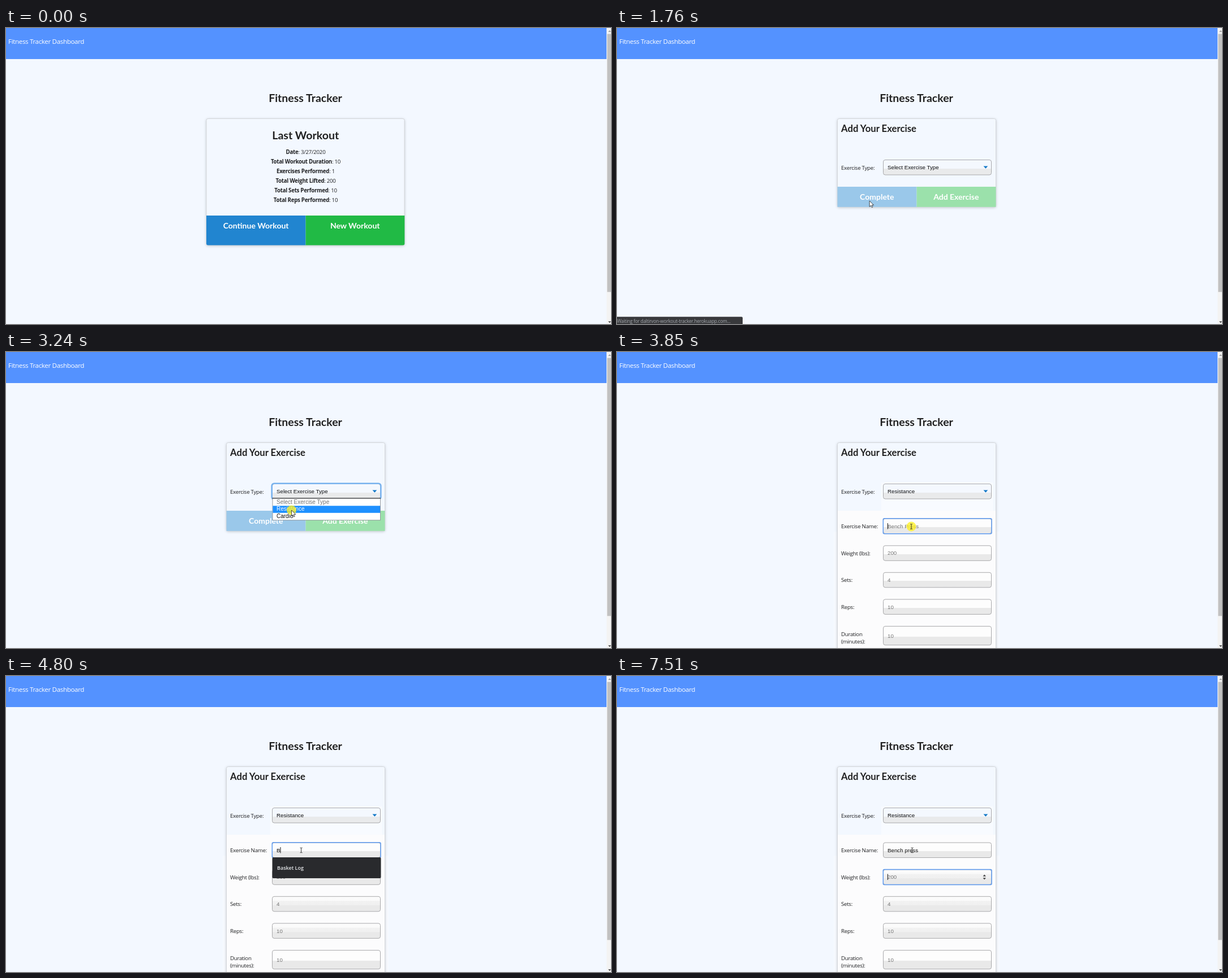
Recreate the animation shown at these times as an HTML page. Size 1069 by 524 pixels, loop 8000 ms.

```html
<!DOCTYPE html>
<html lang="en">
<head>
<meta charset="utf-8">
<title>Fitness Tracker</title>
<style>
  html, body { margin: 0; width: 100%; height: 100%; overflow: hidden; background: #f3f8ff; }
  svg { display: block; width: 1069px; height: 524px; }
  text { white-space: pre; }
  .ui { font-family: "Open Sans", "Noto Sans", sans-serif; font-size: 9.72px; letter-spacing: -.03em; fill: #212224; }
  .ui .b { font-weight: 700; }
  .head { font-family: Lato, sans-serif; font-weight: 700; fill: #212121; }
  .btn { font-family: Lato, sans-serif; font-weight: 700; font-size: 14px; fill: #fff; }
  .field { font-family: "Liberation Sans", Arial, sans-serif; font-size: 9.72px; fill: #0c0c0c; }
  .option { font-size: 10px; }
  .hint { fill: #757575; }
  .mid { text-anchor: middle; }
  .card { filter: drop-shadow(0 1px 2px rgba(34,36,38,.22)); }
</style>
</head>
<body>
<svg id="stage" viewBox="0 0 1069 524" xmlns="http://www.w3.org/2000/svg"></svg>
<script>
const LOOP = 8000;
const SWAP = 1500, FOCUS = 2380, OPEN = 2610, HOVER = 2930, EXPAND = 3310, NAME_FOCUS = 3780, TAB = 7510;

const rect = (x, y, x2, y2, fill, extra = "") =>
  `<rect x="${x}" y="${y}" width="${x2 - x}" height="${y2 - y}" fill="${fill}" ${extra}/>`;
const text = (x, y, cls, str, extra = "") =>
  `<text x="${x}" y="${y}" class="${cls}" ${extra}>${str}</text>`;
const group = (id, ...parts) => `<g id="${id}">${parts.join("")}</g>`;
const gradient = (id, stops) =>
  `<linearGradient id="${id}" x2="0" y2="1">${stops.map(([at, color]) =>
    `<stop offset="${at}" stop-color="${color}"/>`).join("")}</linearGradient>`;
const box = (y, y2, fill, id = "") =>
  rect(470.5, y, 661.5, y2, fill, `rx="3.5" stroke="#a9a9ab" ${id && `id="${id}"`}`);
const ring = (id, y, y2) =>
  rect(470.3, y, 662, y2, "none", `id="${id}" rx="2" stroke="#5d9af0" stroke-width="1.5"`);
const card = (x, x2, y2) =>
  rect(x, 160.5, x2, y2, "#f3f8ff", `rx="3" stroke="#d3d6da" class="card"`);

const stats = [
  ["Date", "3/27/2020"], ["Total Workout Duration", 10], ["Exercises Performed", 1],
  ["Total Weight Lifted", 200], ["Total Sets Performed", 10], ["Total Reps Performed", 10],
].map(([label, value], i) => text(529.5, 223.2 + i * 17.05, "ui mid",
  `<tspan class="b">${label}</tspan>: ${value}`)).join("");

const buttons = group("buttons",
  rect(389.5, 281, 529.5, 316.8, "#9ac8ea"), rect(529.5, 281, 669.5, 316.8, "#9be1ab"),
  text(459.3, 304.2, "btn mid", "Complete"), text(599.3, 304.2, "btn mid", "Add Exercise"));

const homePage = group("home",
  card(354, 704, 384.5),
  text(529.3, 197.3, "head mid", "Last Workout", 'font-size="19.6"'), stats,
  `<path id="continue" d="M354 332H529.5V384.5H357Q354 384.5 354 381.5Z"/>`,
  `<path d="M529.5 332H704.3V381.5Q704.3 384.5 701.3 384.5H529.5Z" fill="#21ba45"/>`,
  text(441.6, 355.2, "btn mid", "Continue Workout"), text(616.7, 355.2, "btn mid", "New Workout"));

const details = group("details",
  rect(383, 318, 389, 524, "#f7faff"), rect(670, 318, 676, 524, "#f7faff"),
  card(389.5, 669.5, 560),
  rect(390, 281, 669, 524, "#fcfcfd"), rect(467, 231, 664.5, 281, "#f8fbff"),
  text(396, 312, "ui", "Exercise Name:"), text(396, 359.8, "ui", "Weight (lbs):"),
  text(396, 407.4, "ui", "Sets:"), text(396, 455, "ui", "Reps:"),
  text(396, 502.6, "ui", "Duration"), text(396, 516, "ui", "(minutes):"),
  box(295, 321.5, "url(#split)"), box(342.8, 369.3, "url(#split)", "weightBox"),
  box(390.3, 416.8, "url(#split)", "setsBox"), box(437.9, 464.4, "url(#split)", "repsBox"),
  box(485.5, 518.8, "url(#split)"),
  ring("nameRing", 294.8, 321.8), ring("weightRing", 342.6, 369.6),
  text(478, 311.7, "field", "", 'id="name"'),
  text(478, 359.3, "field hint", "200"), text(478, 407, "field hint", "4"),
  text(478, 454.6, "field hint", "10"), text(478, 505.7, "field hint", "10"),
  `<path id="spinner" d="M646.5 354.8L649.2 351.6 652 354.8ZM646.5 357.2L649.2 360.4 652 357.2Z" fill="#444"/>`,
  group("suggestion", rect(470.5, 321, 662.5, 358, "#292a2d", 'rx="2"'),
    text(479, 342.5, "ui", "Basket Log", 'style="fill:#e8eaed;font-weight:600;font-size:9px;letter-spacing:0"')),
  rect(0, 0, 1, 10.5, "#111", 'id="caret"'));

const select = [
  text(396, 250.6, "ui", "Exercise Type:"),
  box(233.5, 260, "url(#selectFill)"),
  rect(469.7, 232.7, 662.3, 261, "none", 'id="selectRing" rx="4" stroke="#78b2ee" stroke-width="2.6"'),
  text(478, 249.8, "field", "", 'id="choice"'),
  `<path d="M647.5 244.5H655.3L651.4 248.8Z" fill="#0f76c6"/>`,
].join("");

const options = group("options",
  rect(471, 259, 661.5, 297.7, "#fff", 'stroke="#8c9096" stroke-width=".9"'),
  rect(470.5, 258.4, 662, 259.4, "#222"),
  rect(471.4, 272.3, 661, 284.8, "#1e90ff", 'id="highlight"'),
  text(478, 268.6, "field option hint", "Select Exercise Type"),
  text(478, 281.4, "field option", "Resistance", 'id="firstOption"'),
  text(478, 294, "field option", "Cardio"));

const exercisePage = group("exercise",
  group("compact", card(389.5, 669.5, 316.8), buttons), details,
  text(396, 184.2, "head", "Add Your Exercise", 'font-size="16.7"'), select, options);

const outline = 'fill="#fff" stroke="#222" stroke-width=".8" stroke-linejoin="round"';
const cursors = group("cursor",
  `<path id="arrow" d="M0 0V10.4L2.5 8.2 4.2 11.8 5.8 11 4.2 7.5H7.4Z" ${outline}/>`,
  `<path id="hand" d="M-1 7.6V1Q0-.5 1 1V4.4L4.6 5.4Q6 5.8 5.9 7.4L5 11.4V13.2H.2V11.6L-2.6 8.2Q-3 6.4-1 7.6Z" ${outline}/>`,
  `<path id="beam" d="M-2-4.3H-.6L0-3.8 .6-4.3H2M0-3.8V3.8M-2 4.3H-.6L0 3.8 .6 4.3H2" fill="none" stroke="#222" stroke-width=".9"/>`);

document.getElementById("stage").innerHTML = [
  "<defs>",
  gradient("selectFill", [[0, "#f4f8fe"], [.57, "#f4f8fe"], [.57, "#e9eaeb"], [1, "#e9eaeb"]]),
  gradient("split", [[0, "#fdfdfd"], [.57, "#fdfdfd"], [.57, "#e9e9e9"], [1, "#e9e9e9"]]),
  gradient("soft", [[0, "#fcfcfc"], [.28, "#fafafa"], [.3, "#f2f2f2"], [.57, "#f0f0f0"], [.6, "#e9e9e9"], [1, "#e9e9e9"]]),
  "</defs>",
  rect(0, 0, 1069, 524, "#f3f8ff"),
  rect(0, 0, 1061.3, 55, "#5492ff"),
  text(4, 28.2, "ui", "Fitness Tracker Dashboard", 'style="fill:#fff;font-size:11.6px"'),
  text(529, 131, "head mid", "Fitness Tracker", 'font-size="19.5"'),
  homePage, exercisePage,
  rect(1061.3, 0, 1069, 524, "#f3f3f3"), rect(1062.3, 10.5, 1069, 467.3, "#c1c1c1"),
  '<path d="M1064 7L1066.7 4 1069 7Z" fill="#a0a0a0"/><path d="M1064 519.3H1069L1066.7 522.3Z" fill="#444"/>',
  group("status",
    '<path id="statusBar" fill="#38393c"/>',
    text(0, 521.7, "ui", "", 'id="statusText" style="fill:#a4a8ad;font-size:8.33px"')),
  '<circle id="click" r="8.5" fill="#fff01c" fill-opacity=".75"/>',
  cursors,
].join("");

const el = {};
document.querySelectorAll("#stage [id]").forEach(node => el[node.id] = node);
const show = (id, on) => { el[id].style.display = on ? "" : "none"; };
const setText = (id, str) => { if (el[id].textContent !== str) el[id].textContent = str; };

// time, x, y of the pointer tip
const path = [
  [180, 684, 441], [660, 402.5, 353.5], [1400, 402.5, 353.5], [2150, 495, 252.7],
  [2640, 495, 252.7], [3080, 504.5, 280], [3310, 504.5, 280], [3780, 520, 309],
  [4080, 520, 309], [4240, 521.6, 308.4],
];
const clicks = [[1050, 1120], [FOCUS, 2460], [3240, EXPAND], [NAME_FOCUS, 3930]];
const typing = [
  [4800, "B"], [5040, "Bn"], [5190, "Bne"], [5480, "Bn"], [5570, "B"], [5660, "Be"],
  [5820, "Ben"], [6030, "Benc"], [6200, "Bench"], [6440, "Bench "], [6580, "Bench p"],
  [6980, "Bench pr"], [7050, "Bench pre"], [7120, "Bench pres"], [7290, "Bench press"],
];
const HOST = "daltirvon-workout-tracker.herokuapp.com";
const LINK = `https://${HOST}/exercise?id=5e7e622f52809600173a83de`;

function pointerAt(t) {
  const next = path.findIndex(p => p[0] > t);
  if (next < 1) return next ? path[path.length - 1].slice(1) : path[0].slice(1);
  const [t0, x0, y0] = path[next - 1], [t1, x1, y1] = path[next];
  const k = (t - t0) / (t1 - t0), e = k * k * (3 - 2 * k);
  return [x0 + (x1 - x0) * e, y0 + (y1 - y0) * e];
}

function drawForm(t) {
  const expanded = t >= EXPAND, opened = t >= OPEN && !expanded;
  show("compact", !expanded);
  show("details", expanded);
  show("options", opened);
  show("highlight", t >= HOVER);
  el.firstOption.style.fill = t >= HOVER ? "#fff" : "";
  show("selectRing", t >= FOCUS && t < EXPAND + 160);
  setText("choice", expanded ? "Resistance" : "Select Exercise Type");
  if (!expanded) return;

  const typed = typing.filter(([at]) => at <= t).pop()?.[1] ?? "";
  const inWeight = t >= TAB;
  setText("name", typed || "Bench Press");
  el.name.setAttribute("class", typed ? "field" : "field hint");
  show("nameRing", t >= NAME_FOCUS && !inWeight);
  show("weightRing", inWeight);
  show("spinner", inWeight);
  show("suggestion", t >= 4800 && t < 5040);
  el.weightBox.setAttribute("fill", inWeight ? "url(#soft)" : "url(#split)");
  for (const id of ["setsBox", "repsBox"])
    el[id].setAttribute("fill", t >= 4800 ? "url(#soft)" : "url(#split)");

  show("caret", t >= NAME_FOCUS && !(t >= 4410 && t < 4800));
  const caretX = typed && !inWeight ? 478 + el.name.getComputedTextLength() : 477.8;
  el.caret.setAttribute("x", caretX);
  el.caret.setAttribute("y", inWeight ? 350.5 : 303);
}

function drawStatus(t) {
  const waiting = t >= 1350, width = waiting ? 222 : 349;
  show("status", t >= 800 && t < 2240);
  el.status.setAttribute("opacity", t < 900 ? .5 : 1);
  el.statusBar.setAttribute("d", `M0 511.3H${width - 2}Q${width} 511.3 ${width} 513.3V524H0Z`);
  setText("statusText", waiting ? `Waiting for ${HOST}...` : LINK);
}

function draw(t) {
  const home = t < SWAP, [x, y] = pointerAt(t);
  const onLink = home && t >= 180 && x < 529.5 && y > 332 && y < 384.5;
  const onInput = t >= EXPAND && y > 295;
  show("home", home);
  show("exercise", !home);
  el.continue.setAttribute("fill", onLink ? "#1070b8" : "#2185d0");
  if (!home) drawForm(t);
  drawStatus(t);

  show("cursor", t >= 180);
  show("hand", onLink);
  show("beam", onInput);
  show("arrow", !onLink && !onInput);
  el.cursor.setAttribute("transform", `translate(${x} ${y})`);
  show("click", clicks.some(([from, to]) => t >= from && t < to));
  el.click.setAttribute("cx", x);
  el.click.setAttribute("cy", y);
}

const start = performance.now();
function tick() {
  draw((performance.now() - start) % LOOP);
  requestAnimationFrame(tick);
}
tick();
</script>
</body>
</html>
```
